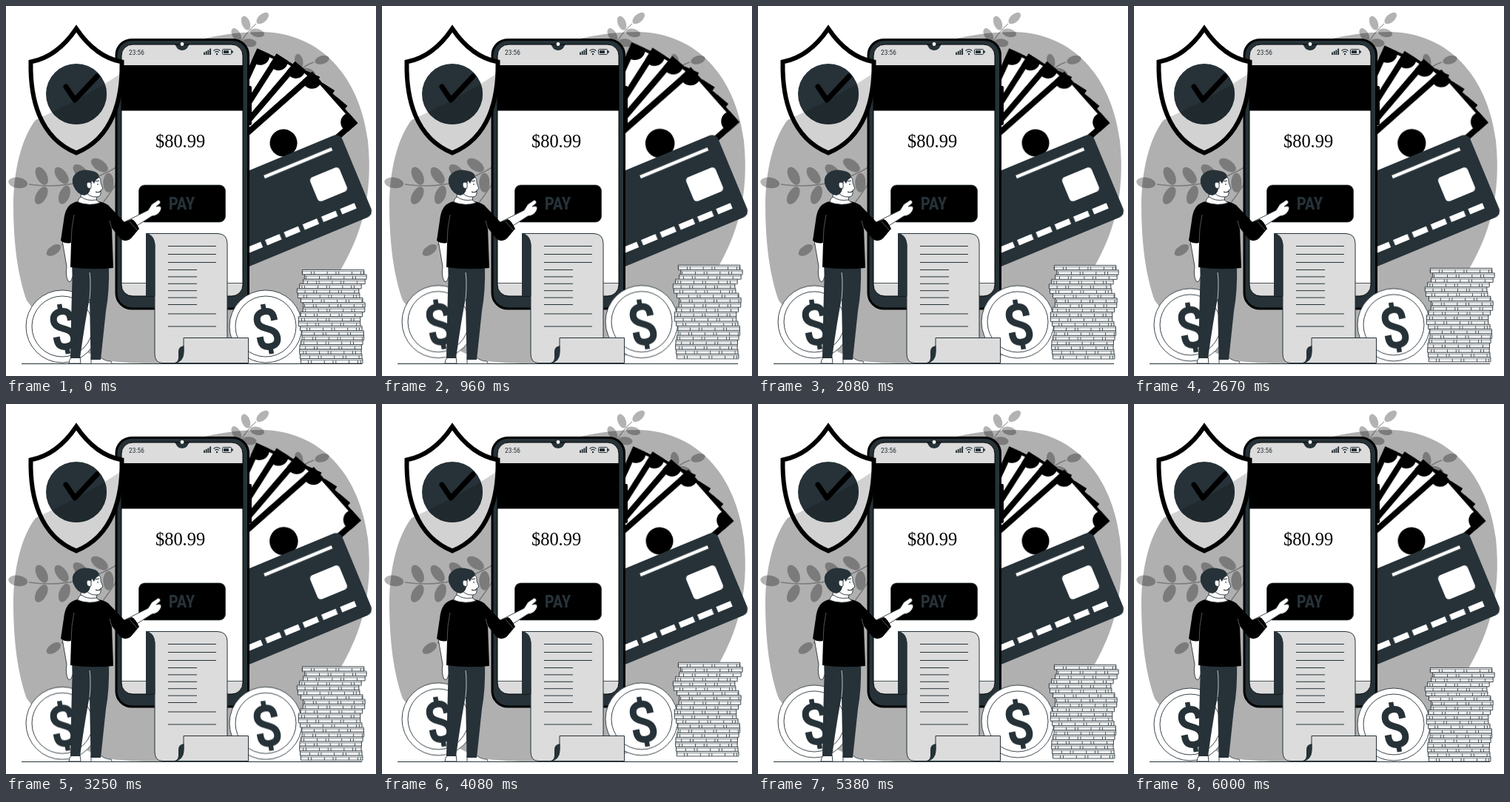
Recreate the animation shown at these times as an HTML page. Size 500 by 500 pixels, loop 6040 ms.

```html
<!DOCTYPE html>
<html lang="en">
<head>
<meta charset="utf-8">
<title>Mobile payment</title>
<style>
  html, body { margin: 0; width: 100%; height: 100%; overflow: hidden; background: #fff; }
  svg { display: block; width: 100vw; height: 100vh; }
  .dark { fill: #263238; }
  .white { fill: #fff; }
  .paper { fill: #dcdcdc; stroke: #263238; }
  .line { fill: none; stroke: #263238; }
  .ink { fill: #fff; stroke: #263238; stroke-width: .9; stroke-linejoin: round; }
  .narrow { font-family: "Roboto Condensed", "Open Sans Condensed", Roboto, sans-serif; font-stretch: 75%; }
  #money { transform-origin: 366px 176px; }
</style>
</head>
<body>
<svg viewBox="0 0 500 500">
  <defs>
    <path id="blob" d="M10 270C10 225 20 180 40 154C75 138 120 116 160 88C215 55 280 35 345 35C425 36 478 95 489 182C497 260 478 312 452 357C432 400 410 425 388 445C340 483 260 484 200 483C165 483 145 481 130 477C90 462 55 435 28 398C16 365 10 320 10 270Z"/>
    <path id="shield" d="M95 30.5Q121 69 156.500 75.500C157.500 125 145 178 95 198.500C45 178 32.500 125 33.500 75.500Q69 69 95 30.500Z"/>
    <clipPath id="inShield"><use href="#shield"/></clipPath>
    <clipPath id="inBadge"><circle cx="95" cy="119" r="41"/></clipPath>
    <clipPath id="inScreen"><rect x="156" y="52" width="164" height="340" rx="15"/></clipPath>
    <clipPath id="inBill"><rect x="-93" y="-46.500" width="186" height="93"/></clipPath>
    <g id="coin">
      <circle class="ink" r="49"/>
      <circle class="ink" r="41"/>
      <g transform="translate(2 3.500) rotate(-10)" fill="none" stroke="#263238">
        <path stroke-width="9" d="M11.500 -10V-13C11.500 -21 7 -24 0 -24C-8 -24 -11.500 -19 -11.500 -13C-11.500 1 11.500 -2 11.500 13C11.500 20 8 24 0 24C-8 24 -11.500 20 -11.500 13V9"/>
        <path stroke-width="6.500" d="M0 -34V-24M0 24V34"/>
      </g>
    </g>
    <g id="bill" clip-path="url(#inBill)">
      <rect x="-93" y="-46.500" width="186" height="93"/>
      <rect class="white" x="-89" y="-38.500" width="178" height="77"/>
      <circle cx="86" cy="-39" r="13"/>
      <circle cx="86" cy="39" r="13"/>
      <circle r="18.500"/>
    </g>
  </defs>

  <use href="#blob" fill="#b0b0b0"/>
  <g id="plants" opacity=".3"></g>
  <g id="money"></g>

  <g transform="translate(451 171.500) rotate(-22.500)">
    <rect class="dark" x="-190" width="190" height="120" rx="9"/>
    <rect class="white" x="-62" y="41" width="43" height="35" rx="5"/>
    <g fill="none" stroke="#fff">
      <path stroke-width="4.500" d="M-18 16H-117"/>
      <path stroke-width="8" stroke-dasharray="21 6.400" d="M-18 99H-180"/>
    </g>
  </g>

  <!-- phone -->
  <rect x="326" y="108" width="6" height="53" rx="2"/>
  <rect x="149" y="45.500" width="178.500" height="363.500" rx="21" class="dark" stroke="#000" stroke-width="3"/>
  <g clip-path="url(#inScreen)">
    <path class="white" d="M156 52H320V392H156Z"/>
    <path fill="#dcdcdc" d="M156 52H320V80H156ZM156 374H320V392H156Z"/>
    <path d="M156 80H320V141.500H156Z"/>
    <path class="dark" d="M226 51Q229 52 230 55A9 9 0 0 0 246 55Q247 52 250 51Z"/>
  </g>
  <rect x="156" y="52" width="164" height="340" rx="15" fill="none" stroke="#000"/>
  <path class="line" d="M156 374.500H320" stroke-width=".8"/>
  <circle class="white" cx="238" cy="51.500" r="2.400"/>
  <text class="narrow dark" x="166" y="66" font-size="9.500">23:56</text>
  <path class="line" stroke-width="1.900" d="M268 66V62.500M270.700 66V61M273.400 66V59.500M276.100 66V57.500"/>
  <path class="line" stroke-width="1.100" d="M280.500 60.500Q285 56.500 289.500 60.500M282.300 62.700Q285 60.200 287.700 62.700"/>
  <circle class="dark" cx="285" cy="65" r="1.200"/>
  <rect class="line" x="292.500" y="58.500" width="12" height="7" rx="1"/>
  <path class="dark" d="M294 60H301V64H294ZM305 60.500H306.800V63.500H305Z"/>
  <text x="202" y="191" font-size="24.400" font-family="Liberation Serif, serif">$80.99</text>
  <rect x="179.500" y="242" width="117" height="50" rx="8" stroke="#263238" stroke-width=".7"/>
  <text class="narrow dark" x="237.500" y="274.500" font-size="23" font-weight="700" text-anchor="middle">PAY</text>

  <!-- shield -->
  <use href="#shield" fill="#fff"/>
  <use href="#blob" fill="#d2d2d2" clip-path="url(#inShield)"/>
  <circle class="dark" cx="95" cy="119" r="41"/>
  <use href="#blob" fill="#1f292e" clip-path="url(#inBadge)"/>
  <use href="#shield" fill="none" stroke="#000" stroke-width="6"/>
  <path d="M81 109L93 127L123 95" fill="none" stroke="#000" stroke-width="7" stroke-linecap="round" stroke-linejoin="round"/>

  <path class="line" d="M21 483.500H481"/>
  <g id="coins">
    <use href="#coin" x="76" y="433"/>
    <use href="#coin" x="351" y="433"/>
    <g id="stack"></g>
  </g>

  <!-- receipt -->
  <path class="paper" d="M189 307.500H286Q299 308 299 321V449H327V482.500H211Q201 482 201 470V322Q199 309 189 307.500Z"/>
  <path class="dark" d="M189 307Q201.500 309 201.500 325V392H189Z"/>
  <path class="paper" d="M240 448.500H327.500V482.500H228Q240 480 240 466Z"/>
  <path class="dark" d="M240.500 459Q233 460 233 467V476Q232 482 226 483Q240.500 482 240.500 467Z"/>
  <path class="line" id="rows"/>

  <!-- person -->
  <g>
    <path class="ink" d="M89 474H100L101 483H85Q85 478 89 474ZM115 474H127Q133 480 142 480Q144 483 142 483.500H115Z"/>
    <path class="dark" d="M90 350H139Q140 385 135 412L128 478H114.500L113 395Q107 425 100 476H87Q88 420 90 350Z"/>
    <path fill="none" stroke="#fff" stroke-width=".7" d="M113 360Q115 375 113 396"/>
    <path class="ink" d="M76 317L82 352Q80 364 84 372Q88 375 90 365L89 317Z"/>
    <path class="ink" d="M160 292L192 276L197 268L206 262Q210 264 208 267L203 271Q212 269 209 276Q206 283 197 284L169 302Z"/>
    <path d="M98 264Q80 266 78 290L74 317Q80 322 88 320L87 353Q115 357 145 354L143 300L155 315Q163 320 169 314L180 301Q175 290 170 288L160 292L138 269Q130 264 122 264Z"/>
    <path fill="none" stroke="#8a8a8a" stroke-width=".6" d="M92 282Q88 300 88 320M140 290L143 301M167 291L178 304"/>
    <path class="ink" d="M103 249L100 261Q108 268 123 266L122 257Z"/>
    <path class="ink" d="M97 265Q98 259 102 258Q109 264 122 262L127 266Q112 271 97 265Z"/>
    <path class="ink" d="M108 235L125 230Q129 234 128 239L131 247L128 249Q129 258 123 258Q112 259 106 249Z"/>
    <path class="dark" d="M126 232Q121 234 119 240L116 236L114 247Q113 254 106 256Q96 255 91 243Q87 231 96 225Q104 219 117 223Q126 225 126 232Z"/>
    <path class="ink" d="M115 239Q109 236 109 242Q110 248 115 246Z"/>
    <path class="line" stroke-width="1.100" d="M121 237L126 236M124 240V242M121 251Q125 253 128 250"/>
  </g>
</svg>
<script>
const $ = id => document.getElementById(id);
const range = n => [...Array(n).keys()];
const each = (n, draw) => range(n).map(draw).join('');

// a curved stem with one leaf at its tip and pairs of leaves along it
function branch(tip, bend, root, pairs, size) {
  const at = (t, k) => (1 - t) ** 2 * tip[k] + 2 * t * (1 - t) * bend[k] + t * t * root[k];
  const angle = t => Math.atan2(at(t - .01, 1) - at(t + .01, 1), at(t - .01, 0) - at(t + .01, 0)) * 180 / Math.PI;
  const leaf = (t, turn) => `<ellipse cx="${size * 1.15}" rx="${size}" ry="${size * .55}"
    transform="translate(${at(t, 0)} ${at(t, 1)}) rotate(${angle(t) + turn})"/>`;
  return `<path d="M${tip}Q${bend} ${root}" fill="none" stroke="#000" stroke-width="1.5"/>` + leaf(0, 0) +
    each(pairs, i => leaf((i + .8) / (pairs + .2), 62) + leaf((i + .8) / (pairs + .2), -62));
}
$('plants').innerHTML =
  branch([31, 241], [95, 250], [149, 218], 4, 13) +
  branch([75, 323], [110, 300], [149, 240], 1, 11) +
  branch([338, 24], [324, 36], [313, 56], 2, 10) +
  branch([416, 76], [402, 80], [390, 94], 1, 10);

// fanned bills, rear one first
$('money').innerHTML = each(4, i =>
  `<use href="#bill" transform="rotate(${-8 * (3 - i)} 303 248) translate(375 185) rotate(-41.500)"/>`);

const step = 6.32, width = 83.5;
$('stack').innerHTML = each(20, i => {
  const x = 398 + 6 * Math.sin(i + .4) * (1 - i / 22), y = 356.6 + i * step;
  return `<rect class="ink" x="${x}" y="${y}" width="${width}" height="${step}"/>
    <path class="line" stroke-width=".6" d="M${x} ${y + 2.2}h${width}"/>
    <path class="line" stroke-width="4" d="M${x} ${y + 4.2}h${width}"
      stroke-dasharray=".8 11 .8 3 .8 17" stroke-dashoffset="${i * 47 % 33}"/>`;
});

const row = (y, right) => `M219 ${y}H${right}`;
$('rows').setAttribute('d',
  each(3, i => row(324.5 + 11 * i, 284)) +
  each(6, i => row(356.5 + 9.4 * i, 258)) +
  each(2, i => row(416 + 17 * i, 284)));

const loop = 6040;
const play = (id, steps, toCss) => $(id).animate(
  steps.map(([ms, v]) => ({ offset: ms / loop, transform: toCss(v) })),
  { duration: loop, iterations: Infinity });

// coins bob up and down twice, the money beats twice and rests
play('coins', [...range(5).map(i => [i * 1500, i % 2 * -10]), [loop, 0]], v => `translateY(${v}px)`);
play('money', [[0, 1], [600, 1.1], [1800, 1], [2400, 1], [3000, 1.07], [3600, 1], [loop, 1]], v => `scale(${v})`);
</script>
</body>
</html>
```
